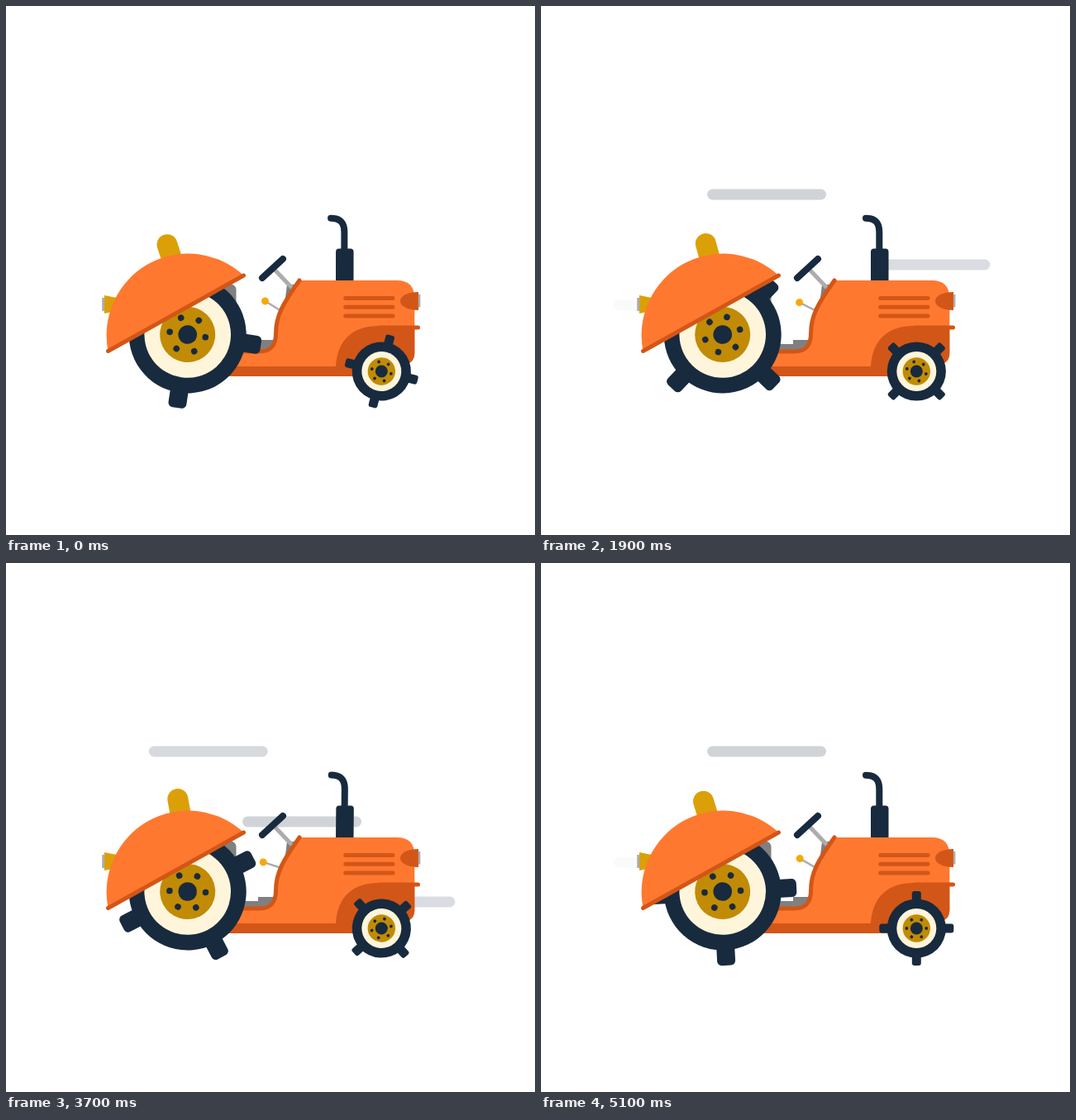
Recreate the animation shown at these times as an HTML page. Size 640 by 640 pixels, loop 5.2 s.

```html
<!DOCTYPE html>
<html lang="en">
<head>
<meta charset="utf-8">
<title>Tractor</title>
<style>
  html, body { margin: 0; width: 100%; height: 100%; overflow: hidden; background: #fff; }
  svg { display: block; width: 100vw; height: 100vh; }
  .navy { fill: #182a3e; }
  .orange { fill: #ff782f; }
  .rust { fill: #d25617; }
  .gold { fill: #dba007; }
  .hub { fill: #c18b05; }
  .cream { fill: #fff5db; }
  .gray { fill: #808080; }
  .silver { fill: #acacac; }
  .line { fill: none; stroke-linecap: round; stroke-width: 5; }
  .line.navy { stroke: #182a3e; stroke-width: 8; }
  .line.rust { stroke: #d25617; }
  .line.silver { stroke: #acacac; }
</style>
</head>
<body>
<svg viewBox="0 0 640 640">
  <g id="wind"></g>

  <rect class="gray" x="250" y="336.5" width="28.5" height="44" rx="7"/>
  <path class="gray" d="M340 337H352L336 369Z"/>
  <path class="gray" d="M280 409H305V404H328V416H280Z"/>
  <g id="lever">
    <path class="line silver" style="stroke-width:2.5" d="M333 369L313.5 357"/>
    <circle cx="313.5" cy="357" r="4.5" fill="#f5a90a"/>
  </g>
  <path class="line silver" d="M324 318L345 340"/>
  <path class="line navy" d="M310 329L335 306"/>

  <g id="exhaust">
    <path class="line navy" d="M409.3 300V274C409.3 262 404 256.7 393 256.7"/>
    <path class="navy" d="M399 333V297.5Q399 293.5 403 293.5H416.5Q420.5 293.5 420.5 297.5V333Z"/>
  </g>

  <path class="orange" d="M355 332H473Q494.3 332 494.3 354V420Q494 432 482 434L430 448H265V418H306C320 418 326.5 411 326.5 396C326.5 375 335 360 355 332Z"/>
  <path class="rust" d="M265 436H399C401 405 418 387 452 387H494.3V420Q494 432 482 434L430 448H265Z"/>
  <path class="line rust" d="M355 332C335 360 326.5 375 326.5 396C326.5 411 320 418 306 418H270"/>
  <path class="line rust" d="M452 389H498.5M410.7 353.4H468M410.7 364.2H468M410.7 375H468"/>
  <path class="rust" d="M499 346C485 346 477 351 477 357C477 363 485 367.5 499 368Z"/>
  <rect class="silver" x="498.8" y="349" width="2.5" height="15.5"/>

  <path class="gold" d="M119 350L134 353V369L119 372Z"/>
  <rect class="silver" x="116.2" y="353" width="3" height="16"/>
  <rect id="beacon" class="gold" x="212.5" y="271.5" width="25" height="70" rx="12.5"/>

  <g id="rear"></g>
  <path class="orange" d="M123.5 417.5A98.7 98.7 0 0 1 287.5 326Z"/>
  <path class="line rust" d="M123.5 417.5L287.5 326"/>
  <g id="front"></g>
</svg>
<script>
const LOOP = 5200, STEP = 100, TICK = 40;
const byId = id => document.getElementById(id);
const rear = byId('rear'), front = byId('front'), lever = byId('lever');
const beacon = byId('beacon'), exhaust = byId('exhaust');

const disc = (cls, r, x = 0, spin = 0) =>
  `<circle class="${cls}" cx="${x}" r="${r}" transform="rotate(${spin})"/>`;

function buildWheel(group, tyre, cream, hub, axle, boltRing, bolt, reach, lug, corner) {
  let parts = '';
  for (let a = 0; a < 360; a += 90)
    parts += `<rect class="navy" x="${tyre - 10}" y="${-lug / 2}" width="${reach - tyre + 10}"
      height="${lug}" rx="${corner}" transform="rotate(${a})"/>`;
  parts += disc('navy', tyre) + disc('cream', cream) + disc('hub', hub) + disc('navy', axle);
  for (let a = 0; a < 360; a += 60) parts += disc('navy', bolt, boltRing, a);
  group.innerHTML = parts;
}
buildWheel(rear, 71, 52.3, 33.5, 11.3, 21.8, 3.8, 89.5, 22, 5.5);
buildWheel(front, 35.6, 24, 16.7, 7.5, 11.9, 1.9, 45, 11, 3);

// Wind streaks: row centre and first tick; each row runs three times.
const RUNS = [0, 43, 80];
const streaks = [[228, 30], [270.5, 15], [313, 1], [362, 22], [410, 9]].map(([y, first]) => {
  const bar = document.createElementNS('http://www.w3.org/2000/svg', 'rect');
  bar.setAttribute('class', 'navy');
  bar.setAttribute('y', y - 6.5);
  bar.setAttribute('width', 144);
  bar.setAttribute('height', 13);
  bar.setAttribute('rx', 6.5);
  byId('wind').append(bar);
  return { bar, first };
});

const turn = (el, ...args) => el.setAttribute('transform', `rotate(${args})`);
const triangle = p => 1 - Math.abs(1 - 2 * (p % 1));

function draw(time) {
  const tick = Math.floor(Math.floor(time % LOOP / STEP) * STEP / TICK);

  for (const { bar, first } of streaks) {
    const age = RUNS.map(run => tick - first - run).find(k => k >= 0 && k < 26);
    const fade = age === undefined ? 0 : Math.min(1, (age + 1) / 5, (26 - age) / 8);
    bar.setAttribute('x', 441.8 - 14.16 * (age || 0));
    bar.setAttribute('opacity', 0.2 * fade);
  }

  rear.setAttribute('transform', `translate(219.7 397.5) rotate(${8.414 * (tick + 1)})`);
  front.setAttribute('transform', `translate(454.3 442) rotate(${14.0625 * (tick + 1)})`);

  const sway = triangle(0.0386 * tick + 0.025);
  turn(beacon, -18.5 + 9.8 * sway, 225, 381);
  turn(lever, 0.8 - 17 * sway, 333, 369);
  turn(exhaust, 0.85 * (1 - Math.cos((tick + 1) * Math.PI / 8)), 410, 333);
}

function loop(now) {
  draw(now);
  requestAnimationFrame(loop);
}
draw(0);
requestAnimationFrame(loop);
</script>
</body>
</html>
```
